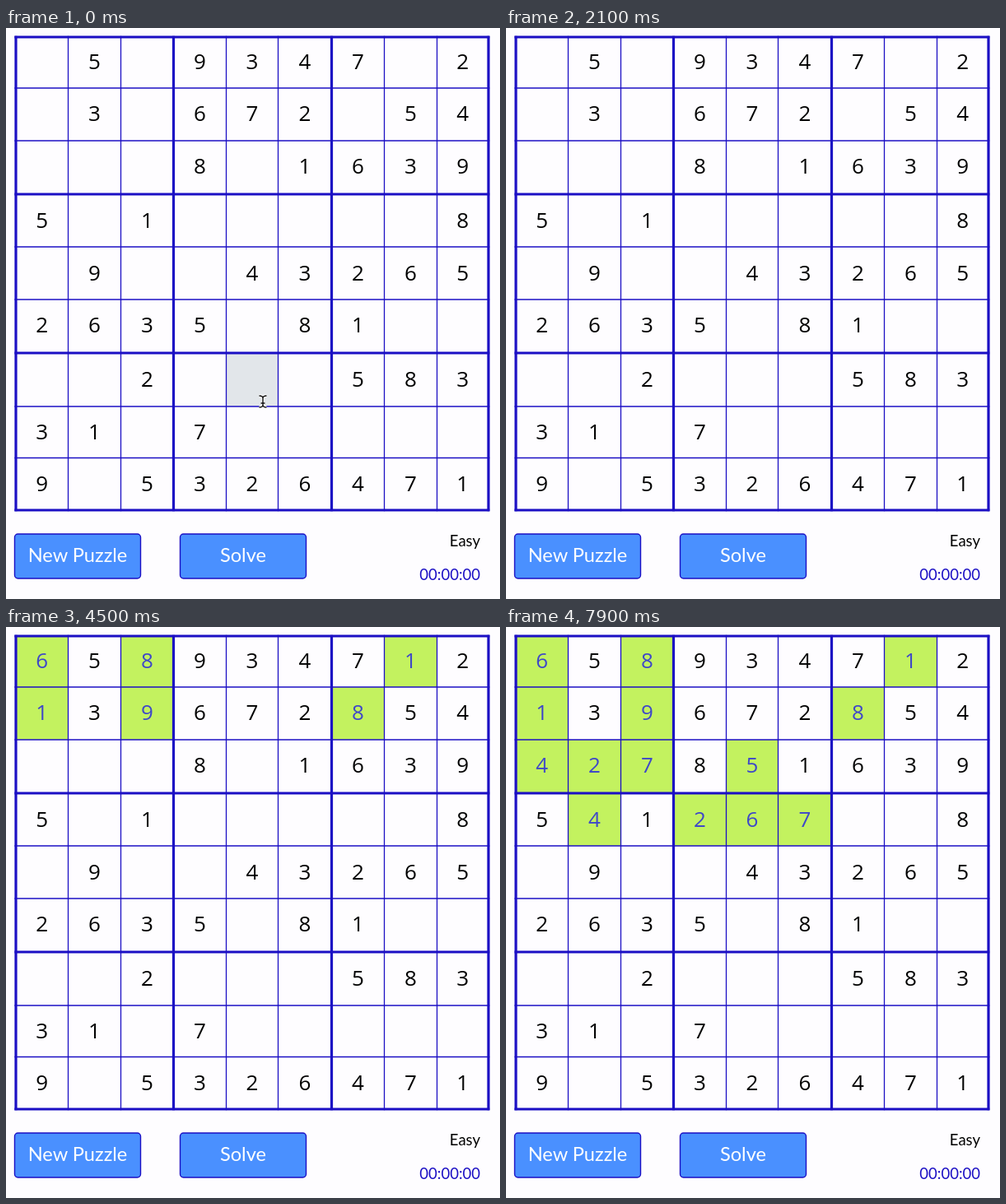
These frames come from a looping animation (600 px wide and 694 px high, 8000 ms). An HTML page:

```html
<!DOCTYPE html>
<html lang="en">
<head>
<meta charset="utf-8">
<title>Sudoku solver</title>
<style>
  html, body { margin: 0; width: 100%; height: 100%; overflow: hidden; background: #fefdff; }
  svg { display: block; width: 100vw; height: 100vh; }
  text { font-family: Lato, "Open Sans", sans-serif; }
  .digit { font: 26px "Open Sans", "Noto Sans", sans-serif; text-anchor: middle; }
  .button { font-size: 23.6px; fill: #fff; text-anchor: middle; }
  .status { font-size: 18.5px; text-anchor: end; }
</style>
</head>
<body>
<svg id="stage" viewBox="0 0 600 694"></svg>
<script>
const LOOP = 8000, STEP = 400, FIRST_MOVE = 100;
const INK = '#1b0fc4', PEN = '#3f48c8', GREEN = '#c3f25f', GREY = '#e2e6ea';
const PUZZLE = [
  ' 5 9347 2',
  ' 3 672 54',
  '   8 1639',
  '5 1     8',
  ' 9  43265',
  '2635 81  ',
  '  2   583',
  '31 7     ',
  '9 5326471',
];
const EDGE_X = [12, 75.5, 139.5, 203.5, 267.5, 330.5, 395.5, 459.5, 523.5, 586];
const EDGE_Y = [11, 73, 137, 202, 266, 330, 395, 460, 522.5, 586];
const DIGIT_Y = [41, 104, 167.5, 234, 298, 360.5, 426.5, 490.5, 554];

const stage = document.getElementById('stage');

function add(tag, attrs, text) {
  const el = document.createElementNS('http://www.w3.org/2000/svg', tag);
  for (const name in attrs) el.setAttribute(name, attrs[name]);
  if (text) el.textContent = text;
  return stage.appendChild(el);
}

// Records every placement and removal the backtracking search makes.
function recordMoves(limit) {
  const grid = PUZZLE.map(row => [...row]);
  const moves = [];
  const fits = (r, c, d) => {
    for (let i = 0; i < 9; i++) {
      const boxRow = r - r % 3 + Math.floor(i / 3), boxCol = c - c % 3 + i % 3;
      if (grid[r][i] === d || grid[i][c] === d || grid[boxRow][boxCol] === d) return false;
    }
    return true;
  };
  const put = (r, c, d) => {
    grid[r][c] = d;
    moves.push({ r, c, d });
  };
  const solve = pos => {
    while (pos < 81 && grid[Math.floor(pos / 9)][pos % 9] !== ' ') pos++;
    if (pos === 81 || moves.length >= limit) return true;
    const r = Math.floor(pos / 9), c = pos % 9;
    for (const d of '123456789') {
      if (!fits(r, c, d)) continue;
      put(r, c, d);
      if (solve(pos + 1)) return true;
      put(r, c, ' ');
    }
    return false;
  };
  solve(0);
  return moves;
}

function buildCells() {
  const fills = PUZZLE.map((row, r) => [...row].map((_, c) => add('rect', {
    x: EDGE_X[c], y: EDGE_Y[r],
    width: EDGE_X[c + 1] - EDGE_X[c], height: EDGE_Y[r + 1] - EDGE_Y[r], fill: 'none',
  })));
  EDGE_X.forEach((x, i) => add('path', {
    d: `M${x} 9.8V587.3`, stroke: INK, 'stroke-width': i % 3 ? 1.3 : 3.2 }));
  EDGE_Y.forEach((y, i) => add('path', {
    d: `M10.4 ${y}H587.3`, stroke: INK, 'stroke-width': i % 3 ? 1.3 : 3.2 }));
  return fills.map((row, r) => row.map((fill, c) => ({
    fill,
    label: add('text', {
      class: 'digit', x: (EDGE_X[c] + EDGE_X[c + 1]) / 2, y: DIGIT_Y[r] + 9.3,
    }, PUZZLE[r][c]),
  })));
}

function addButton(x, label) {
  add('rect', { x, y: 615, width: 153, height: 54, rx: 4, fill: '#4a90ff', stroke: INK, 'stroke-width': 1.4 });
  add('text', { class: 'button', x: x + 76.5, y: 648.5 }, label);
}

const cells = buildCells();
addButton(10.5, 'New Puzzle');
addButton(211.5, 'Solve');
add('text', { class: 'status', x: 576, y: 629.5 }, 'Easy');
add('text', { class: 'status', x: 576, y: 670.5, fill: INK }, '00:00:00');

const beam = 'M307.5 447Q312 447 312 450V458Q312 461 307.5 461M316.5 447Q312 447 312 450M312 458Q312 461 316.5 461M309.5 456H314.5';
const pointer = [['#fff', 3.4], ['#111', 1.4]].map(([stroke, width]) =>
  add('path', { d: beam, fill: 'none', stroke, 'stroke-width': width }));

const moves = recordMoves(LOOP / STEP);

function render(time) {
  const done = Math.floor((time - FIRST_MOVE) / STEP) + 1;
  const idle = done <= 0;
  const grid = PUZZLE.map(row => [...row]);
  for (const { r, c, d } of moves.slice(0, done)) grid[r][c] = d;
  cells.forEach((row, r) => row.forEach(({ fill, label }, c) => {
    const solved = PUZZLE[r][c] === ' ' && grid[r][c] !== ' ';
    const hovered = idle && r === 6 && c === 4;
    label.textContent = grid[r][c];
    label.setAttribute('fill', solved ? PEN : '#000');
    fill.setAttribute('fill', solved ? GREEN : hovered ? GREY : 'none');
  }));
  pointer.forEach(path => path.setAttribute('visibility', idle ? 'visible' : 'hidden'));
}

const start = performance.now();
function tick() {
  render((performance.now() - start) % LOOP);
  requestAnimationFrame(tick);
}
tick();
</script>
</body>
</html>
```
